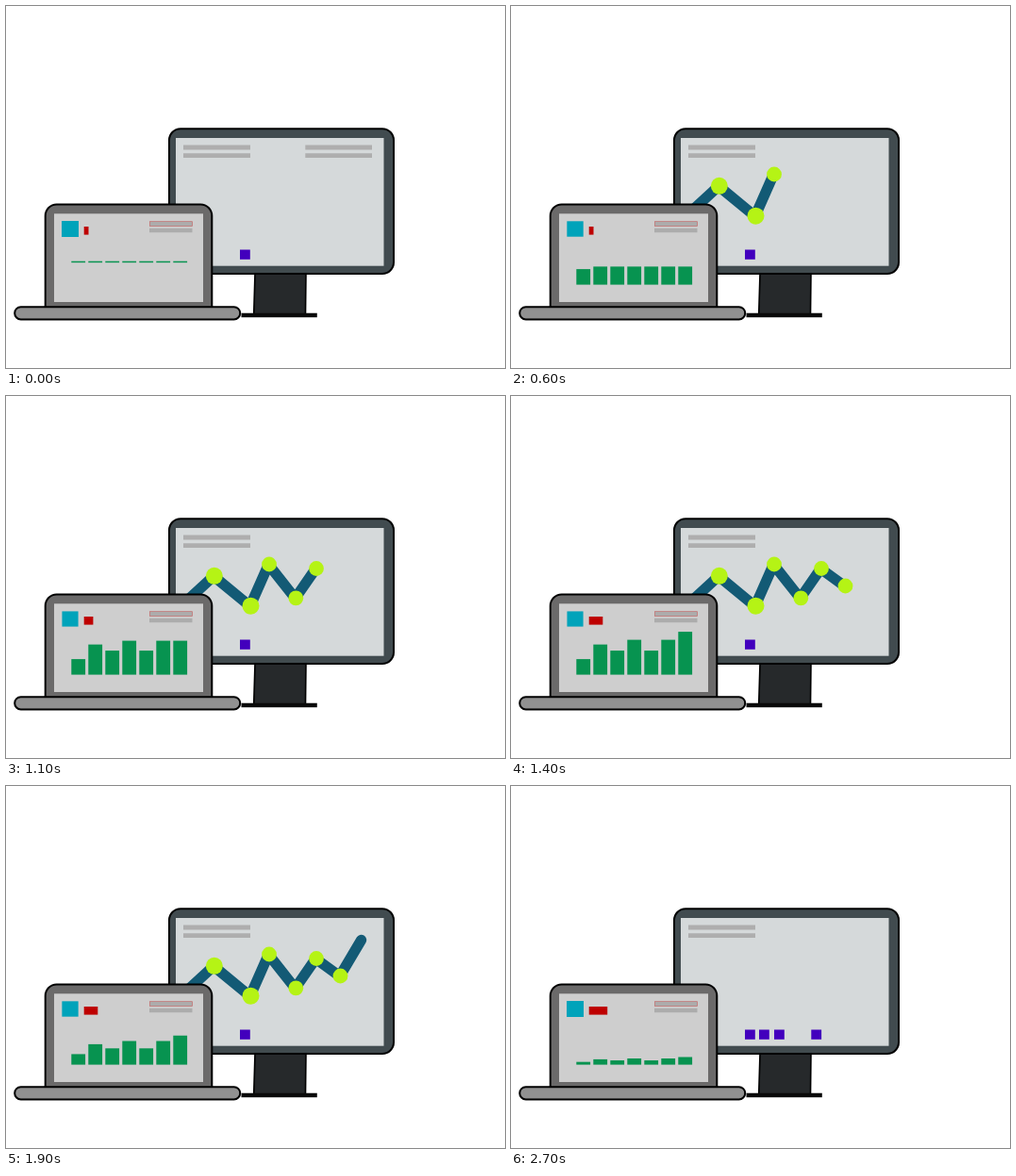
Animation of 529x384 px, one loop 2.8 s. Source, as an HTML page:

```html
<!DOCTYPE html>
<html lang="en">
<head>
<meta charset="utf-8">
<title>Dashboard on two screens</title>
<style>
html, body { margin: 0; width: 100%; height: 100%; overflow: hidden; background: #fff; }
svg { display: block; width: 529px; height: 384px; }
</style>
</head>
<body>
<svg viewBox="0 0 529 384">
  <!-- monitor -->
  <path d="M264 283H318L317.5 327H262.7Z" fill="#26292b" stroke="#000" stroke-width="1.6"/>
  <path d="M249.5 328H329.8" stroke="#0a0a0a" stroke-width="4.4"/>
  <rect x="173" y="130.2" width="238" height="153.8" rx="12" fill="#414b4f" stroke="#000" stroke-width="2"/>
  <rect x="180" y="140" width="220.5" height="135.7" fill="#d5d9da"/>
  <path d="M188 150H259M188 158.7H259" stroke="#aeaeae" stroke-width="4.8"/>
  <path id="notes" d="M317.3 150H388M317.3 158.7H388" stroke="#aeaeae" stroke-width="4.8"/>
  <g id="squares" fill="#4200bd"></g>
  <g id="chart">
    <polyline id="line" transform="translate(-.7 .3)" fill="none" stroke="#135a75" stroke-width="11.2" stroke-linecap="round" stroke-linejoin="round"/>
    <g id="dots" fill="#b5f315"></g>
  </g>
  <!-- laptop -->
  <path d="M41.7 320V222.5a12 12 0 0 1 12-12H206.3a12 12 0 0 1 12 12V320Z" fill="#6b6a6a" stroke="#000" stroke-width="2"/>
  <rect x="51" y="220.3" width="158" height="93.7" fill="#cecece"/>
  <rect x="9.2" y="319.2" width="239" height="13.2" rx="6.5" fill="#919191" stroke="#000" stroke-width="2"/>
  <rect x="152.5" y="228.7" width="45" height="4.8" fill="#acacac" stroke="#c46a6a" stroke-width=".7"/>
  <path d="M152 237.9H197.5" stroke="#acacac" stroke-width="4.5"/>
  <rect id="tile" fill="#00a3ba"/>
  <rect id="tag" x="82.7" y="234" height="8.6" fill="#be0000"/>
  <g id="bars" fill="#079350"></g>
</svg>
<script>
const $ = id => document.getElementById(id);

function set(el, attrs) {
  for (const key in attrs) el.setAttribute(key, attrs[key]);
}
function add(parent, name, attrs) {
  const el = document.createElementNS("http://www.w3.org/2000/svg", name);
  set(el, attrs);
  return $(parent).appendChild(el);
}
const show = (el, on) => el.style.display = on ? "" : "none";

const points = [[189, 220], [220.8, 190.8], [259.5, 222.7], [279, 178.5],
  [307.3, 214.3], [329, 183], [354.5, 201.5], [377.3, 163]];
const dots = points.slice(1, -1).map(([cx, cy], i) =>
  add("dots", "circle", { cx, cy, r: i < 2 ? 9 : 7.9 }));

const squares = [248, 263, 279, 318.3].map(x =>
  add("squares", "rect", { x, y: 258.5, width: 10.8, height: 10.3 }));

const bars = [16.5, 32, 25.5, 37, 25.5, 37, 45.5].map((full, i) =>
  ({ full, el: add("bars", "rect", { x: 69.3 + 18 * i, width: 14.8 }) }));

// Each segment takes two steps; the pen rests once before the last one.
function drawChart(n) {
  const pen = Math.min(points.length - 1, (n > 12 ? n - 1 : n) / 2);
  const k = Math.floor(pen), path = points.slice(0, k + 1);
  if (pen > k) path.push(points[k].map((v, j) => v + (points[k + 1][j] - v) * (pen - k)));
  set($("line"), { points: path.join(" ") });
  dots.forEach((dot, i) => show(dot, pen > i));
  dots.forEach((dot, i) => show(dot, pen >= i + 1));
  show($("chart"), n > 0 && n < 18);
}

// Bars rise together up to their own limit, then shrink in proportion.
function drawBars(n) {
  const rise = Math.max(1.5, 3.2 * n + 2 * Math.max(0, n - 8));
  const shrink = 1 - .0715 * (n - 12.5);
  const base = n ? 295.6 : 272.2;
  for (const { full, el } of bars) {
    const height = n < 14 ? Math.min(full, rise) : full * shrink;
    set(el, { y: base - height, height });
  }
}

function draw(time) {
  // 28 ticks per loop, three of which repeat the step before.
  const tick = Math.floor(time / 100) % 28;
  const n = tick - (tick >= 7) - (tick >= 15) - (tick >= 22);

  show($("notes"), n === 0);
  drawChart(n);
  drawBars(n);
  squares.forEach((sq, i) => show(sq, i === 0 || n >= 20 + i));

  const s = 1 - .05 * Math.sin(Math.PI * n / 24);
  set($("tile"), { x: 68 - 9 * s, y: 236.5 - 8.5 * s, width: 18 * s, height: 17 * s });
  set($("tag"), { width: 4.8 + 4.9 * Math.floor(n / 6.4) });
}

let start;
function frame(now) {
  start ??= now;
  draw(now - start);
  requestAnimationFrame(frame);
}
draw(0);
requestAnimationFrame(frame);
</script>
</body>
</html>
```
